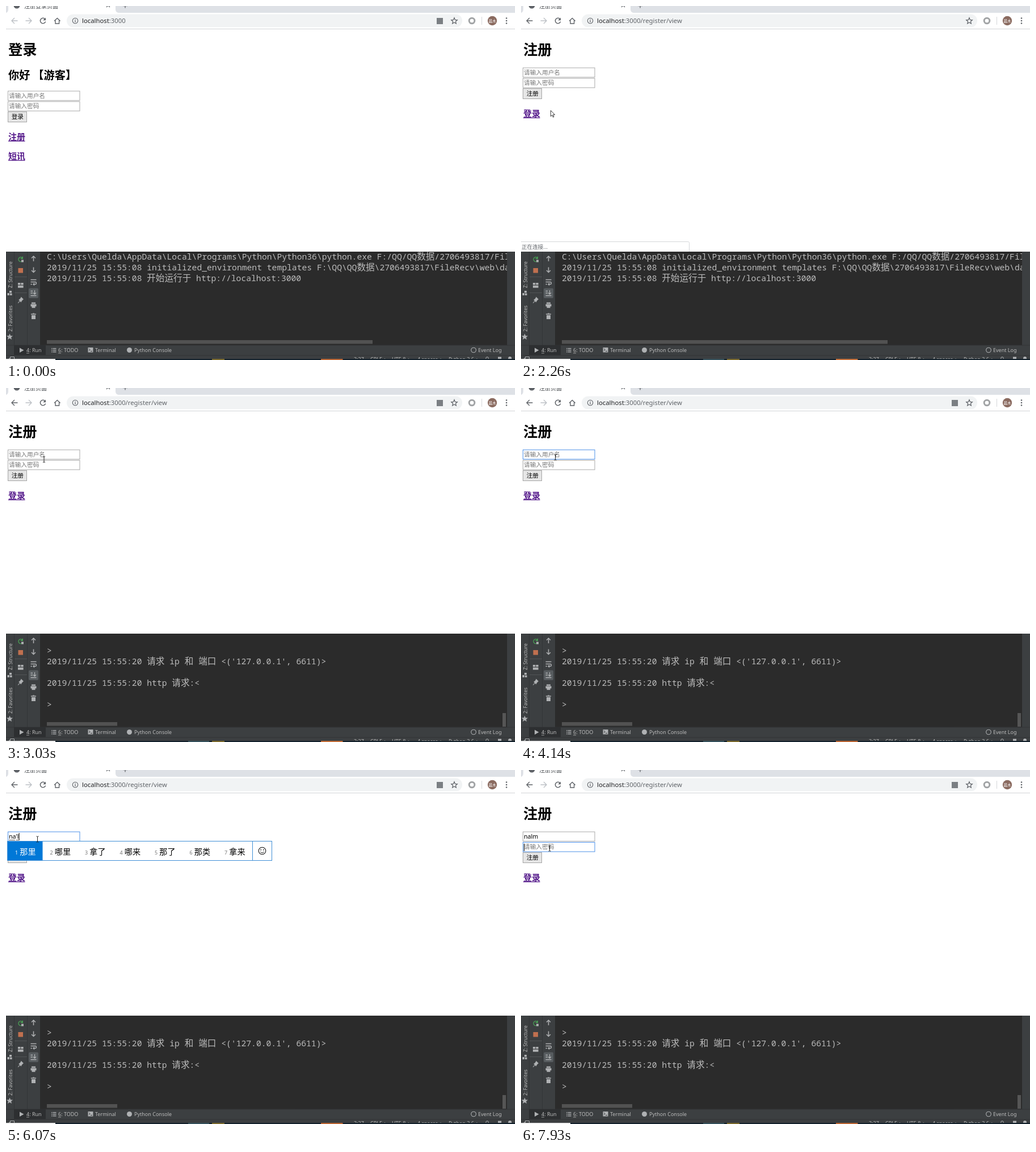
Write an HTML page that moves like this. It is 897 px wide and 624 px high and loops after 8 s.

```html
<!DOCTYPE html>
<html lang="zh-CN">
<head>
<meta charset="utf-8">
<title>注册登录</title>
<style>
html, body { margin: 0; width: 100%; height: 100%; overflow: hidden; background: #fff; }
svg { display: block; width: 897px; height: 624px; }
text { font-family: "Noto Sans", "Noto Sans CJK SC", "Noto Sans CJK", sans-serif; white-space: pre; }
.mono { font-family: "Noto Sans Mono", "Noto Sans CJK SC", "Noto Sans CJK", monospace; }
.han { font-size: 15.6px; font-weight: 300; }
</style>
</head>
<body>
<svg id="stage" viewBox="0 0 897 624"></svg>
<script>
const LOOP = 8000, LINE = 19;
const USER = 'nalm';
const stage = document.getElementById('stage');

const esc = s => s.replace(/&/g, '&amp;').replace(/</g, '&lt;');
const text = (x, y, size, s, fill = '#000', attrs = '') =>
  `<text x="${x}" y="${y}" font-size="${size}" fill="${fill}" ${attrs}>${esc(s)}</text>`;
const rect = (x, y, w, h, fill, attrs = '') =>
  `<rect x="${x}" y="${y}" width="${w}" height="${h}" fill="${fill}" ${attrs}/>`;
const circle = (x, y, r, fill, attrs = '') =>
  `<circle cx="${x}" cy="${y}" r="${r}" fill="${fill}" ${attrs}/>`;
const stroke = (d, color, width = 1.3, attrs = '') =>
  `<path d="${d}" fill="none" stroke="${color}" stroke-width="${width}" ${attrs}/>`;
const shape = (d, fill) => `<path d="${d}" fill="${fill}"/>`;
const group = (id, body, attrs = '') => `<g id="${id}" ${attrs}>${body}</g>`;

// ---- browser ----
const DARK = '#5f6368', PALE = '#bdc1c6';
const backArrow = 'M20.5 26H10M15 21L10 26L15 31';

function browser() {
  return rect(0, 0, 897, 12, '#dee1e6') +
    shape('M0 12Q4 11 4 6V0H193V6Q193 11 198 12Z', '#fff') +
    circle(19, -1, 5.5, DARK) +
    text(32, 3.5, 10, '', '#45494d', 'id="tabTitle"') +
    stroke('M177 -4L183 2M183 -4L177 2', DARK, 1.2) +
    stroke('M206 -.5H214M210 -4V3.5', DARK) +
    rect(0, 12, 897, 28, '#fff') + rect(0, 40, 897, 1, '#d2d4d7') +
    stroke(backArrow, PALE, 1.4, 'id="back"') +
    stroke('M34.5 26H45M40 21L45 26L40 31', PALE, 1.4) +
    stroke('M68.8 23A4.7 4.7 0 1 0 69.6 27.5', DARK, 1.5) + shape('M70 20.5V25.3H65.2Z', DARK) +
    stroke('M85 26.5L90.3 21.5L95.6 26.5M87 25.5V31H93.6V25.5', DARK, 1.4) +
    rect(107, 14.5, 697, 23, '#f1f3f4', 'rx="11.5"') +
    circle(122, 26, 4.7, 'none', `stroke="${DARK}" stroke-width="1.1"`) +
    rect(121.4, 25, 1.2, 3.8, DARK) + rect(121.4, 23, 1.2, 1.2, DARK) +
    `<text x="134" y="30" font-size="11.3" fill="#202124">localhost<tspan id="urlRest" fill="${DARK}"></tspan></text>` +
    rect(759, 21, 11, 11, '#7b7f83', 'id="pageTool"') +
    stroke('M790 20.7L791.5 24.4L795.3 24.7L792.4 27.2L793.3 31L790 29L786.7 31L787.6 27.2L784.7 24.7L788.5 24.4Z', DARK, 1.2) +
    circle(821, 26, 4.8, 'none', 'stroke="#a2a4a6" stroke-width="3"') +
    rect(838, 19, 1, 14, '#d5d7da') +
    circle(857, 26, 8.2, '#8a6a5f') + text(857, 28.5, 6.6, '晨木', '#fff', 'text-anchor="middle"') +
    [21.5, 26, 30.5].map(y => circle(882, y, 1.3, DARK)).join('');
}

// ---- page ----
const input = (id, y) => rect(3.5, y + .5, 126.5, 16.5, '#fff', `id="${id}" stroke="#a9a9a9"`);
const hint = (y, s, id) => text(5, y, 10.67, s, '#757575', `id="${id}"`);
const button = (y, s) => rect(3.5, y + .5, 33, 18, '#e6e6e6', 'stroke="#a6a6a6"') +
  text(9.7, y + 13.3, 10.67, s);
const link = (y, s) => text(4, y, 15, s, '#551a8b', 'font-weight="700"') +
  rect(4, y + 1.5, 29.5, 1.3, '#551a8b');
const heading = (y, size, s) => text(4, y, size, s, '#000', 'font-weight="700"');

const form = (prefix, y, label) =>
  input(prefix + 'User', y) + hint(y + 12, '请输入用户名', prefix + 'UserHint') +
  input(prefix + 'Pass', y + 18.5) + hint(y + 30.6, '请输入密码', prefix + 'PassHint') +
  button(y + 36.5, label);

function pages() {
  const login = heading(85.5, 25.3, '登录') + heading(128.5, 19.2, '你好 【游客】') +
    form('login', 149.5, '登录') + link(236, '注册') + link(270, '短讯');
  const register = heading(85.5, 25.3, '注册') + form('reg', 108.5, '注册') + link(195, '登录') +
    text(5, 121, 10.67, '', '#000', 'id="typed"') +
    stroke('', '#444', .9, 'id="underline" stroke-dasharray="11 1.5 7 1.5"') +
    rect(0, 0, 1, 13, '#000', 'id="caret"');
  return group('login', login) + group('register', register) +
    group('bubble', rect(-1, 415.5, 135, 20, '#fff', 'id="bubbleBox" stroke="#d4d6d9" rx="2"') +
      text(1, 427.5, 9.6, '', DARK, 'id="bubbleText"'));
}

// Candidate strip whose width follows from the words in it.
function candidates(id, words) {
  let x = 3, body = '';
  words.forEach((word, i) => {
    const wordWidth = [...word].reduce((w, c) => w + (c < '\u0100' ? 9 : 14.1), 0);
    const width = wordWidth + 33.3;
    if (!i) body += rect(x, 126, width, 33, '#0078d7');
    body += text(x + 13, 148.5, 9, `${i + 1}`, i ? '#767676' : '#fff') +
      text(x + 21.3, 148.8, 14.1, word, i ? '#000' : '#fff');
    x += width;
  });
  x = Math.round(x);
  const face = x + 17.5;
  return group(id, rect(2.5, 125.5, x + 32, 34, '#fff', 'stroke="#3f8fd6"') + body +
    rect(x, 126, 1, 33, '#3f8fd6') +
    circle(face, 142.5, 6.3, 'none', 'stroke="#111" stroke-width="1.1"') +
    circle(face - 2.3, 140.7, .9, '#111') + circle(face + 2.3, 140.7, .9, '#111') +
    stroke(`M${face - 3.4} 144Q${face} 148 ${face + 3.4} 144`, '#111', 1));
}

// ---- console ----
const LOG = String.raw`C:\Users\Quelda\AppData\Local\Programs\Python\Python36\python.exe F:/QQ/QQ数据/2706493817/FileRecv/web/app.py
2019/11/25 15:55:08 initialized_environment templates F:\QQ\QQ数据\2706493817\FileRecv\web\data
2019/11/25 15:55:08 开始运行于 http://localhost:3000
2019/11/25 15:55:19 请求 ip 和 端口 <('127.0.0.1', 6609)>

2019/11/25 15:55:19 http 请求:<
GET /register/view HTTP/1.1
Host: localhost:3000
Connection: keep-alive
Upgrade-Insecure-Requests: 1
User-Agent: Mozilla/5.0 (Windows NT 10.0; Win64; x64) AppleWebKit/537.36 (KHTML, like Gecko)
Sec-Fetch-User: ?1
Accept: text/html,application/xhtml+xml,application/xml;q=0.9,*/*;q=0.8
Sec-Fetch-Site: same-origin
Sec-Fetch-Mode: navigate
Referer: http://localhost:3000/
Accept-Encoding: gzip, deflate, br
Accept-Language: zh-CN,zh;q=0.9

>
2019/11/25 15:55:19 http 响应:<
HTTP/1.1 200 OK
Content-Type: text/html

<!DOCTYPE html>
<html>
<head>
    <meta charset="utf-8">
    <title>注册页面</title>
</head>
<body>
    <h1>注册</h1>
</body>
</html>

>
2019/11/25 15:55:20 请求 ip 和 端口 <('127.0.0.1', 6611)>

2019/11/25 15:55:20 http 请求:<

>`.split('\n');
const FIRST_LINES = 3;
const END_SCROLL = LINE * (LOG.length - 6) - 21;

function logLine(line, i) {
  const body = esc(line)
    .replace(/[\u4e00-\u9fff]+/g, s => `<tspan class="han">${s}</tspan>`)
    .replace(/^(.*于 <?.*?)(http:\S+)$/, '$1<tspan fill="#287bde" text-decoration="underline">$2</tspan>');
  return `<text class="mono" x="72" y="${447 + LINE * i}" font-size="14.7" fill="#bbb">${body}</text>`;
}

const GREY = '#afb1b3';
function ide() {
  const vertical = (y, s) =>
    `<text transform="translate(10.5 ${y}) rotate(-90)" font-size="8.6" fill="#bbb">${s}</text>`;
  const label = (x, s) => text(x, 610, 9, s, '#bbb');
  const status = (x, s) => text(x, 626, 9, s, '#bbb');
  return rect(0, 433, 897, 191, '#3c3f41') + rect(60, 433, 823, 165, '#2b2b2b') +
    `<clipPath id="view">${rect(60, 433, 823, 165, '#000')}</clipPath>
     <g clip-path="url(#view)">` +
    group('log', LOG.slice(0, FIRST_LINES).map(logLine).join('') +
      group('fresh', LOG.slice(FIRST_LINES).map((s, i) => logLine(s, i + FIRST_LINES)).join(''))) +
    rect(72, 589, 574, 6.5, '#a6a6a6', 'id="hThumb" opacity=".32"') +
    rect(875, 441, 6, 24, '#a6a6a6', 'id="vThumb" opacity=".35"') + '</g>' +
    [14, 37].map(x => rect(x, 433, 1, 165, '#323537')).join('') +
    vertical(497, 'Z: Structure') + vertical(574, '2: Favorites') +
    rect(6, 502, 4, 3.5, GREY) + rect(2.5, 506, 3.5, 4, GREY) + rect(7, 506.5, 3.5, 3.5, GREY) +
    shape('M6.5 577.5L8 581.3L12 581.6L9 584L10 588L6.5 585.8L3 588L4 584L1 581.6L5 581.3Z', GREY) +
    stroke('M28.5 443.5A4 4 0 1 0 27 450.5', '#499c54', 1.4) + shape('M30 441V446H25Z', '#499c54') +
    rect(27, 447.5, 4, 4, GREY) +
    rect(21.5, 462, 8.5, 8.5, '#c0704f') +
    rect(15, 477, 22, 1, '#515456') + rect(15, 505, 22, 1, '#515456') +
    rect(21, 488, 4.3, 3.5, GREY) + rect(26.3, 488, 4.3, 3.5, GREY) + rect(21, 492.7, 9.6, 4, GREY) +
    shape('M26.5 512.5L31 517L29.5 518L27.5 520.5L26.5 522.5L24.7 520.5L21.5 524L20.8 523.2L24 519.7L22.2 518L24 516.7L26 514.5Z', GREY) +
    stroke('M48.5 450V441M45 444.5L48.5 441L52 444.5', GREY, 1.5) +
    stroke('M48.5 460.5V469.5M45 466L48.5 469.5L52 466', GREY, 1.5) +
    stroke('M43.5 482.5H53.5M43.5 486.5H51.5A2 2 0 0 1 51.5 490.5H48.5M43.5 490.5H46M50 488.5L48 490.5L50 492.5', GREY) +
    rect(40, 497.5, 17, 17.5, '#575c5f', 'rx="2"') +
    stroke('M43.5 502.5H47M43.5 506H47M43.5 510.5H53.5M50.5 501V508M48 505.5L50.5 508L53 505.5', GREY) +
    rect(45, 522.5, 7, 2.3, GREY) + rect(43.5, 525.5, 10, 4, GREY) + rect(45.5, 529, 6, 3.2, GREY) +
    rect(44, 542.5, 9, 1.5, GREY) + rect(47, 541.5, 3, 1, GREY) + rect(45, 545, 7, 7, GREY) +
    rect(0, 597.5, 897, 1, '#323537') +
    rect(14, 598, 56, 17.5, '#2d2f31') + shape('M24 602.5L31.5 606.7L24 611Z', GREY) +
    label(36, '4: Run') + rect(36, 611.5, 5, .8, '#bbb') +
    [603, 606, 609].map(y => rect(80, y, 1.5, 1.4, GREY) + rect(82.5, y, 6, 1.4, GREY)).join('') +
    label(92, '6: TODO') + rect(92, 611.5, 5, .8, '#bbb') +
    rect(144.5, 602, 9, 8.5, GREY) + stroke('M146 604L148.2 606L146 608M149 608.5H152', '#3c3f41', 1) +
    label(157, 'Terminal') + circle(217.5, 606.5, 4.5, GREY) + label(226, 'Python Console') +
    circle(824, 606.5, 4.3, 'none', `stroke="${GREY}" stroke-width="1.1"`) + label(832, 'Event Log') +
    rect(0, 615.5, 897, 1, '#323537') +
    stroke('M7.5 624V618.5H14.5V624M5.5 624V621H8', GREY, 1) +
    status(613, '3:37') + status(642, 'CRLF ÷') + status(680, 'UTF-8 ÷') +
    status(725, '4 spaces ÷') + status(780, 'Python 3.6 ÷') +
    circle(848, 621, 2.3, 'none', `stroke="${GREY}"`) + rect(867, 618.5, 6, 4, GREY) + circle(888, 621, 3, GREY) +
    rect(0, 622, 897, 2, '#14222c') + rect(0, 622, 87, 2, '#f2f2f2') +
    rect(321, 622, 37, 2, '#35525c', 'id="task"') + rect(363, 622, 22, 2, '#7c6a2c') +
    rect(555, 622, 38.5, 2, '#c26a35', 'id="alert"');
}

// ---- pointer ----
const POINTERS = {
  arrow: '<path d="M0 0V10.5L2.5 8.3L4.1 12L5.7 11.3L4.1 7.7H7.3Z" fill="#fff" stroke="#222" stroke-width=".9"/>',
  hand: '<path d="M-1 .8Q0 -.6 1.1 .8V5.2L6 6Q7.4 6.4 7.2 8L6.2 12.5V14.5H.5V12.8L-3 9Q-3.8 7.4-2.4 7.2L-1 8.4Z" fill="#fff" stroke="#222" stroke-width=".9"/>',
  beam: stroke('M-2 -5H-.5L0 -4.5L.5 -5H2M0 -4.5V4.5M-2 5H-.5L0 4.5L.5 5H2', '#222', 1)
};
const PATH = [
  [310, 340, 626], [560, 250, 480], [800, 90, 300], [1030, 20, 229], [1170, 18, 231.5],
  [1960, 18, 231.5], [2350, 62.5, 170], [2620, 62.5, 170], [3000, 67, 126], [3660, 67, 126],
  [3820, 68, 124], [4080, 68, 124], [4140, 60.5, 122], [4300, 60.5, 122], [4450, 55.5, 122],
  [7460, 55.5, 122], [7700, 50.5, 138]
];

stage.innerHTML = rect(0, 0, 897, 624, '#fff') + pages() + browser() + ide() +
  candidates('ime1', ['那', '拿', '哪', '呐', '纳', '娜', '钠']) +
  candidates('ime2', ['那里', '哪里', '拿了', '哪来', '那了', '那类', '拿来']) +
  candidates('ime3', ['那里吗', '哪里买', '拿了吗', USER, '哪里', '那里', '拿了']) +
  group('pointer', Object.entries(POINTERS).map(([id, s]) => group(id, s)).join(''));

const $ = id => document.getElementById(id);
const show = (id, on) => $(id).setAttribute('visibility', on ? 'inherit' : 'hidden');
const set = (id, attrs) => Object.entries(attrs).forEach(([k, v]) => $(id).setAttribute(k, v));
const within = (t, a, b) => t >= a && t < b;
const progress = (t, a, b) => Math.min(1, Math.max(0, (t - a) / (b - a)));
const latest = (t, steps) => steps.reduce((v, [at, next]) => t >= at ? next : v, steps[0][1]);

function pointerAt(t) {
  const i = PATH.findIndex(p => p[0] > t);
  if (i < 0) return PATH[PATH.length - 1].slice(1);
  if (i === 0) return PATH[0].slice(1);
  const [t0, x0, y0] = PATH[i - 1], [t1, x1, y1] = PATH[i], k = (t - t0) / (t1 - t0);
  return [x0 + (x1 - x0) * k, y0 + (y1 - y0) * k];
}

function drawBrowser(t) {
  const moved = t >= 2120;
  show('login', !moved);
  show('register', moved);
  $('tabTitle').textContent = moved ? '注册页面' : '注册登录页面';
  $('urlRest').textContent = t >= 1960 ? ':3000/register/view' : ':3000';
  set('back', { stroke: moved ? DARK : PALE });
  show('pageTool', !within(t, 1960, 2350));

  const connecting = t >= 1960;
  show('bubble', within(t, 1040, 2800));
  $('bubbleText').textContent = connecting ? '正在连接...' : 'localhost:3000/register/view';
  set('bubbleBox', { width: connecting ? 297.5 : 135 });
  set('bubble', { opacity: .3 * progress(t, 1000, 1170) + .7 * progress(t, 1500, 1680) });
}

function drawForm(t) {
  const onUser = within(t, 3180, 7930), onPass = t >= 7930;
  set('regUser', { stroke: onUser ? '#4d90e8' : '#a9a9a9' });
  set('regPass', { stroke: onPass ? '#4d90e8' : '#a9a9a9' });

  const typed = latest(t, [[0, ''], [5440, 'n'], [5680, 'na'], [6070, "na'l"], [6850, "na'l'm"], [7390, USER]]);
  $('typed').textContent = typed;
  show('regUserHint', !typed);
  const end = 5 + (typed ? $('typed').getComputedTextLength() : 0);
  set('underline', { d: within(t, 5530, 7390) ? `M5 123.5H${end}` : '' });

  const blinkOn = latest(t, [[0, 0], [3260, 1], [3820, 0], [4380, 1], [4910, 0], [5440, 1], [6690, 0], [6850, 1]]);
  if (blinkOn && t >= 2120) show('caret', true); else show('caret', false);
  set('caret', onPass ? { x: 5, y: 130 } : { x: end, y: 111 });

  show('ime1', within(t, 5680, 6070));
  show('ime2', within(t, 6070, 6850));
  show('ime3', within(t, 6850, 7390));
}

function drawConsole(t) {
  const logged = t >= 2490;
  const k = 1 - (1 - progress(t, 2580, 2960)) ** 2;
  set('log', { transform: `translate(0 ${logged ? -(4 + (END_SCROLL - 4) * k) : 0})` });
  show('fresh', logged);
  show('vThumb', logged);
  set('vThumb', { y: 441 + 132 * k });
  set('hThumb', { width: logged ? 124 : 574 });
  show('task', t >= 1710);
  set('alert', { fill: within(t, 70, 3400) ? '#c8713a' : '#bd6633' });
}

function drawPointer(t) {
  const [x, y] = pointerAt(t);
  const kind = t >= 2980 ? 'beam' : within(t, 1030, 2060) ? 'hand' : 'arrow';
  set('pointer', { transform: `translate(${x} ${y})` });
  Object.keys(POINTERS).forEach(id => show(id, id === kind && t >= 310));
}

function render(t) {
  drawBrowser(t);
  drawForm(t);
  drawConsole(t);
  drawPointer(t);
}

const start = performance.now();
function tick() {
  render((performance.now() - start) % LOOP);
  requestAnimationFrame(tick);
}
render(0);
requestAnimationFrame(tick);
</script>
</body>
</html>
```
